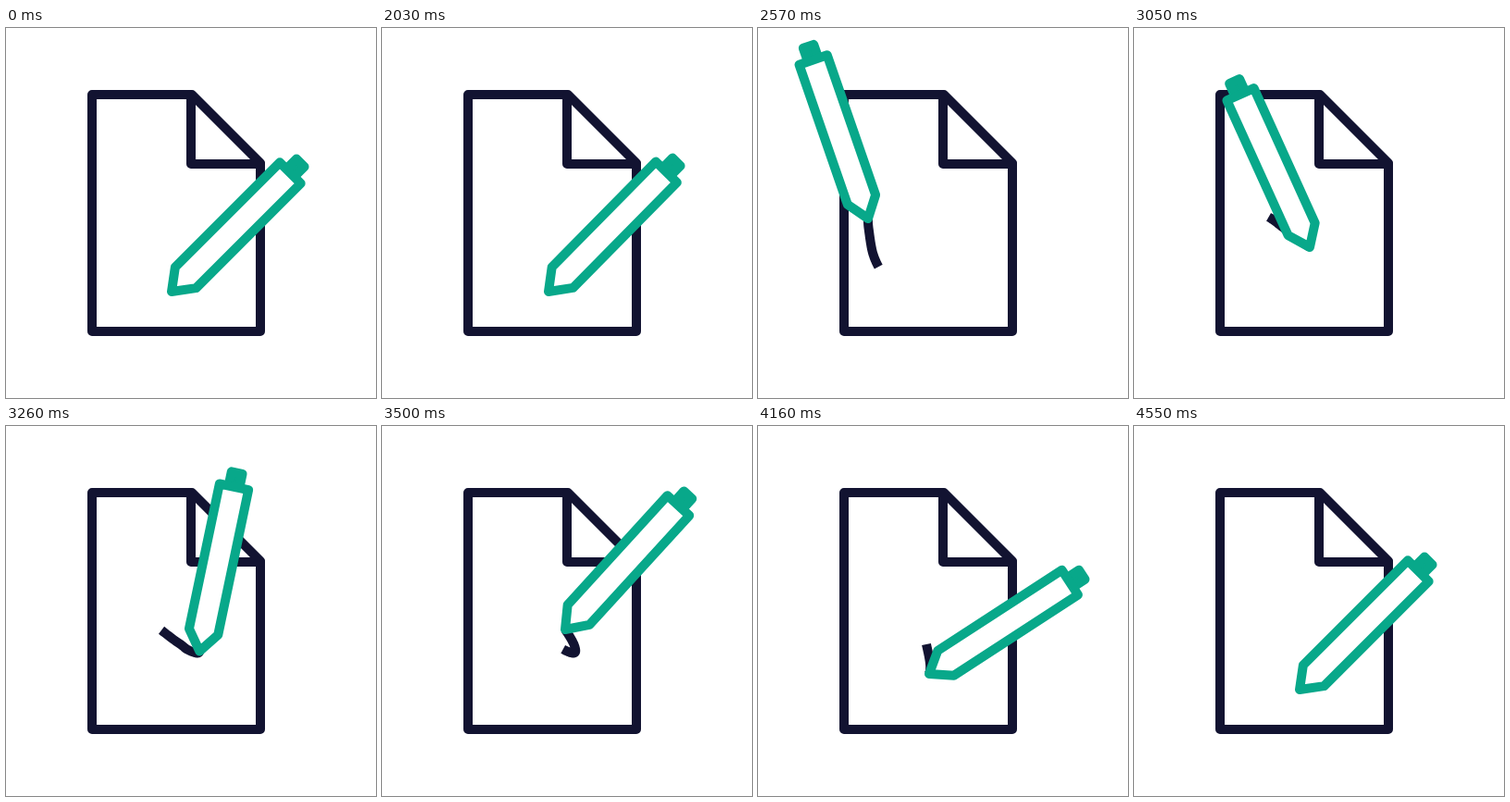
An HTML page with a canvas for the animation above (4.64 s loop, 400x400 px).

```html
<!DOCTYPE html>
<html lang="en">
<head>
<meta charset="utf-8">
<title>Signing a document</title>
<style>
  html, body { margin: 0; width: 100%; height: 100%; overflow: hidden; background: #fff; }
  canvas { display: block; width: 400px; height: 400px; }
</style>
</head>
<body>
<canvas id="stage" width="400" height="400"></canvas>
<script>
const ctx = document.getElementById('stage').getContext('2d');
const INK = '#121331', GREEN = '#08a88a', PAPER = '#fff';
const LOOP = 4640, START = 2030, STEP = 30, LINE = 10;

// Pen pose: time, tip x, tip y, tilt in degrees from vertical
const POSES = [
  [2000, 179, 285, 45],
  [2030, 180, 285, 44.6],
  [2120, 174, 284, 39],
  [2220, 158, 279, 25],
  [2320, 140, 271, 8],
  [2400, 133, 263, -2],
  [2480, 124, 243, -10.8],
  [2540, 119.5, 216, -16.4],
  [2570, 119, 206, -19.1],
  [2650, 120.5, 197, -25.6],
  [2780, 143, 203, -27],
  [2900, 163, 217, -27],
  [3000, 180, 230, -26.3],
  [3050, 190, 237, -24.4],
  [3080, 195, 241, -21.2],
  [3150, 204, 245, -10],
  [3220, 208.5, 245, 4],
  [3300, 209, 241, 19],
  [3400, 206, 233, 32.5],
  [3500, 198, 220, 42.4],
  [3620, 182, 198, 53.7],
  [3740, 173.5, 188, 59],
  [3890, 176, 210, 60.8],
  [4000, 182, 236, 60.5],
  [4100, 186, 257, 58.7],
  [4160, 185, 268, 57],
  [4260, 176, 281, 52],
  [4350, 170.5, 285, 48],
  [4450, 175, 285, 45.6],
  [4550, 179, 285, 45]
];

// Time now, and the earlier pen time at which the visible ink begins
const TAIL = [[2400, 2400], [2540, 2405], [2570, 2425], [3050, 2795],
              [3500, 3085], [3890, 3745], [4160, 4000], [4350, 4350]];

function findSpan(keys, t) {
  let i = 0;
  while (i < keys.length - 2 && t >= keys[i + 1][0]) i++;
  return i;
}

function slope(keys, i, k) {
  if (i === 0 || i === keys.length - 1) return 0;
  const a = keys[i - 1], b = keys[i + 1];
  return (b[k] - a[k]) / (b[0] - a[0]);
}

function poseAt(t) {
  t = Math.min(Math.max(t, POSES[0][0]), POSES[POSES.length - 1][0]);
  const i = findSpan(POSES, t), a = POSES[i], b = POSES[i + 1];
  const h = b[0] - a[0], s = (t - a[0]) / h, r = 1 - s;
  const hermite = k =>
    r * r * (1 + 2 * s) * a[k] + s * s * (3 - 2 * s) * b[k] +
    h * s * r * (r * slope(POSES, i, k) - s * slope(POSES, i + 1, k));
  return { x: hermite(1), y: hermite(2), tilt: hermite(3) * Math.PI / 180 };
}

function tailAt(t) {
  const i = findSpan(TAIL, t), a = TAIL[i], b = TAIL[i + 1];
  return a[1] + (b[1] - a[1]) * (t - a[0]) / (b[0] - a[0]);
}

function shape(points, color, fill, closed = true) {
  ctx.beginPath();
  points.forEach(([x, y]) => ctx.lineTo(x, y));
  if (closed) ctx.closePath();
  if (fill) {
    ctx.fillStyle = fill;
    ctx.fill();
  }
  ctx.strokeStyle = color;
  ctx.stroke();
}

function drawPage() {
  shape([[93, 72], [201, 72], [275, 146], [275, 328], [93, 328]], INK);
  shape([[200, 73], [200, 147], [275, 147]], INK, null, false);
}

function drawInk(t) {
  if (t <= TAIL[0][0] || t >= TAIL[TAIL.length - 1][0]) return;
  const from = tailAt(t), points = [];
  for (let i = 0; i <= 60; i++) {
    const p = poseAt(from + (t - from) * i / 60);
    points.push([p.x, p.y]);
  }
  ctx.lineCap = 'butt';
  shape(points, INK, null, false);
  ctx.lineCap = 'round';
}

function drawPen({ x, y, tilt }) {
  ctx.save();
  ctx.translate(x, y);
  ctx.rotate(tilt);
  shape([[-6, -181], [-6, -197], [6, -197], [6, -181]], GREEN, GREEN);
  shape([[0, 0], [-16, -21.5], [-16, -181.5], [16, -181.5], [16, -21.5]], GREEN, PAPER);
  ctx.restore();
}

function draw(t) {
  ctx.fillStyle = PAPER;
  ctx.fillRect(0, 0, 400, 400);
  ctx.lineWidth = LINE;
  ctx.lineJoin = ctx.lineCap = 'round';
  drawPage();
  drawInk(t);
  drawPen(poseAt(t));
}

let origin = null;
function tick(now) {
  if (origin === null) origin = now;
  const t = (now - origin) % LOOP;
  draw(t < START ? 0 : START + Math.floor((t - START) / STEP) * STEP);
  requestAnimationFrame(tick);
}
draw(0);
requestAnimationFrame(tick);
</script>
</body>
</html>
```
